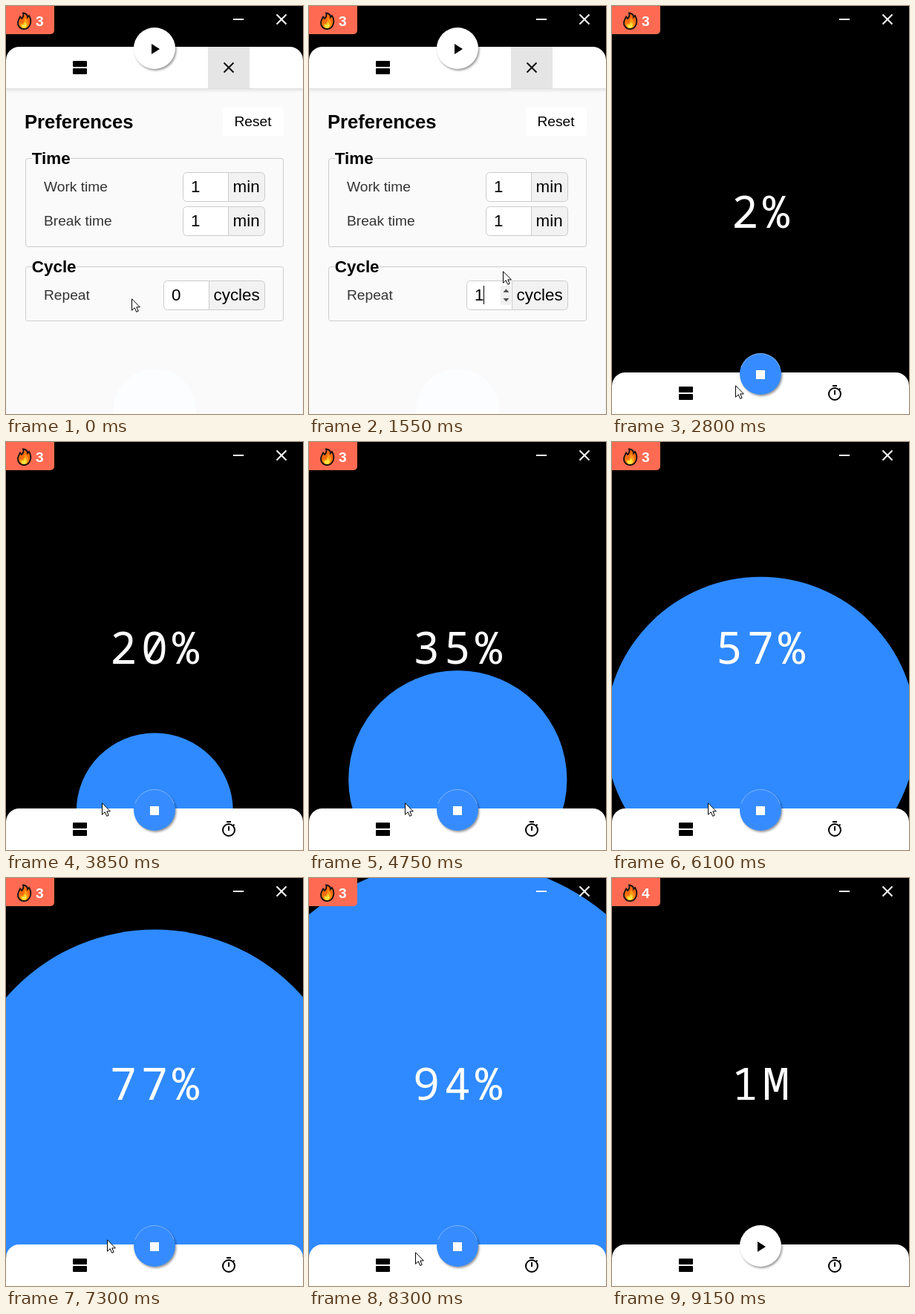
Animation of 400x550 px, one loop 9.7 s. Source, as an HTML page with a canvas:

```html
<!DOCTYPE html>
<html lang="en">
<head>
<meta charset="utf-8">
<title>Focus timer</title>
<style>
  html, body { margin: 0; width: 100%; height: 100%; overflow: hidden; background: #000; }
  canvas { display: block; width: 400px; height: 550px; }
</style>
</head>
<body>
<canvas id="stage" width="400" height="550"></canvas>
<script>
const ctx = document.getElementById('stage').getContext('2d');
const LOOP = 9700, STEP = 50;
const BLUE = '#2f8aff', BORDER = '#cccccc', PANEL = '#fafafa';
const SANS = '"Liberation Sans", Arial, sans-serif';
const CLOSE = 1950, SLIDE = 300, PRESS = 2450, START = 2640, RUN = 6000, DONE = 8700;

// Pointer keys: time, x, y
const POINTER = [
  [100, 169, 394], [350, 205, 402], [600, 244, 392], [800, 244, 392],
  [1000, 252, 383], [1200, 265, 382], [1500, 265, 382], [1550, 261, 357],
  [1850, 300, 85], [2000, 300, 85], [2350, 192, 488], [2450, 188, 490],
  [2500, 176, 493], [2550, 166, 502], [2650, 166, 502], [2700, 166, 511],
  [2850, 166, 511], [3300, 129, 486], [6200, 129, 486], [6650, 132, 487],
  [7300, 136, 487], [7600, 137, 489], [8000, 137, 489], [8650, 150, 521],
  [8800, 156, 551]
];

const clamp = v => Math.max(0, Math.min(1, v));
const smooth = v => v * v * (3 - 2 * v);

function pointerAt(t) {
  const next = POINTER.findIndex(k => k[0] >= t);
  if (next < 0) return POINTER[POINTER.length - 1].slice(1);
  if (next === 0) return POINTER[0].slice(1);
  const a = POINTER[next - 1], b = POINTER[next];
  const u = (t - a[0]) / (b[0] - a[0]);
  return [1, 2].map(i => Math.round(a[i] + (b[i] - a[i]) * u));
}

function rect(x, y, w, h, color) {
  ctx.fillStyle = color;
  ctx.fillRect(x, y, w, h);
}

function rounded(x, y, w, h, radii, fill, stroke) {
  ctx.beginPath();
  ctx.roundRect(x, y, w, h, radii);
  if (fill) { ctx.fillStyle = fill; ctx.fill(); }
  if (stroke) { ctx.strokeStyle = stroke; ctx.lineWidth = 1; ctx.stroke(); }
}

function disc(x, y, r, color) {
  ctx.fillStyle = color;
  ctx.beginPath();
  ctx.arc(x, y, r, 0, Math.PI * 2);
  ctx.fill();
}

function text(str, x, y, size, color = '#000', weight = 400) {
  ctx.font = `${weight} ${size}px ${SANS}`;
  ctx.textAlign = 'left';
  ctx.fillStyle = color;
  ctx.fillText(str, x, y);
}

function lines(d, color, width) {
  ctx.strokeStyle = color;
  ctx.lineWidth = width;
  ctx.stroke(new Path2D(d));
}

function shape(d, color) {
  ctx.fillStyle = color;
  ctx.fill(new Path2D(d));
}

function readout(str) {
  ctx.font = '300 60px "Noto Sans Mono", "DejaVu Sans Mono", monospace';
  ctx.textAlign = 'center';
  ctx.fillStyle = '#fff';
  [...str].forEach((ch, i) => ctx.fillText(ch, 200 + (i - (str.length - 1) / 2) * 42, 299));
}

function progressDisc(p) {
  const r = 49.7 + 277 * p;
  disc(200.3, 505.3 - 561 * p + r, r, BLUE);
}

function titleBar(count) {
  rounded(0, 0, 65, 38, [0, 0, 5, 0], '#ff6b52');
  const flame = 'M23 9.5C28 10 29 13 29 15L31 13C33.5 17 34 21 32.5 25C31 29 28 31 24.5 31C19 31 15.5 27 16 22C16.3 19 18 17 19 14.5L21 17C23 15 24 12 23 9.5Z';
  shape(flame, '#f76a0c');
  lines(flame, '#111', 1.8);
  shape('M25 16C28 19 30.5 21 30 25C29.5 28.5 27 30 24.5 30C20.5 30 18 27 19 23L21 24.5C24 22.5 25.5 19.5 25 16Z', '#ff9b16');
  shape('M25 21.5C27.5 24 28.5 26 27.5 28C26 30.5 22 30.5 21 28C20.4 26.5 21 25.3 21.3 24.5L22.8 25.5C24.4 24.5 25 23.2 25 21.5Z', '#ffe13b');
  text(count, 40, 27, 19.2, '#fff', 700);
  rect(306, 17, 14, 2, '#fff');
  lines('M364.5 11.5L377.5 24.5M377.5 11.5L364.5 24.5', '#fff', 2);
}

function group(label, labelWidth, y, height) {
  rounded(26.5, y + .5, 347, height, 3, null, BORDER);
  rect(35, y - 1, labelWidth, 3, PANEL);
  text(label, 34.8, y + 8, 22.4, '#000', 700);
}

function field(label, value, unit, x, split, y) {
  text(label, 51, y + 26, 19.2, '#333');
  rounded(x + .5, y + .5, split - x, 39, [5, 0, 0, 5], '#fff', BORDER);
  rounded(split + .5, y + .5, 348 - split, 39, [0, 5, 5, 0], '#f2f2f2', BORDER);
  text(value, x + 11, y + 27, 22.4);
  text(unit, split + 6.5, y + 27, 22.4);
}

function preferences(t) {
  rect(0, 111, 400, 439, PANEL);
  const fade = ctx.createLinearGradient(0, 111, 0, 117);
  fade.addColorStop(0, 'rgba(0,0,0,.09)');
  fade.addColorStop(1, 'rgba(0,0,0,0)');
  rect(0, 111, 400, 6, fade);
  rect(0, 111, 1, 439, '#f1f1f1');
  rect(399, 111, 1, 439, '#f1f1f1');

  text('Preferences', 25, 165, 25.6, '#000', 700);
  rounded(292, 137, 82, 38, 4, '#fff');
  text('Reset', 307.5, 162, 19.2);

  group('Time', 52, 205, 119);
  field('Work time', '1', 'min', 238, 299, 224);
  field('Break time', '1', 'min', 238, 299, 270);
  group('Cycle', 60, 351, 73);
  field('Repeat', t >= 1400 ? '1' : '0', 'cycles', 212, 273, 370);

  if (t >= 450) {
    rect(258, 377, 14, 26, '#f0f0f0');
    shape('M261.5 386L265.5 381.5L269.5 386ZM261.5 394L265.5 398.5L269.5 394Z', '#505050');
  }
  if (t >= 1400) rect(235, 377, 1, 25, '#000');
}

function stopwatch() {
  rect(297, 72, 6, 2, '#000');
  rect(299, 79, 2, 6, '#000');
  lines('M308 84A8 8 0 1 1 292 84A8 8 0 1 1 308 84M305.5 78.5L307.5 76.5', '#000', 2);
}

function navigation(open, running) {
  rounded(0, 55, 400, 57, open ? [18, 18, 0, 0] : [18, 18, 0, 0], '#fff');
  if (open) {
    rect(272, 55, 56, 56, '#e5e5e5');
    rect(0, 111, 400, 1, '#dedede');
    lines('M293.5 76.5L306.5 89.5M306.5 76.5L293.5 89.5', '#111', 2);
  } else {
    stopwatch();
  }
  rounded(90, 74, 19, 8, 1, '#000');
  rounded(90, 84, 19, 8, 1, '#000');

  ctx.save();
  ctx.shadowColor = 'rgba(0,0,0,.4)';
  ctx.shadowBlur = 3;
  ctx.shadowOffsetX = 1.5;
  ctx.shadowOffsetY = 2;
  disc(200, 57, 28, running ? '#368cff' : '#fff');
  ctx.restore();

  if (running) {
    ctx.strokeStyle = 'rgba(255,255,255,.35)';
    ctx.lineWidth = 1;
    ctx.beginPath();
    ctx.arc(200, 57, 27.5, Math.PI * 1.1, Math.PI * 1.9);
    ctx.stroke();
    rect(194, 52, 12, 12, '#fff');
  } else {
    shape('M196 51L207 58L196 65Z', '#000');
  }
}

function pointer(t) {
  const [x, y] = pointerAt(t);
  const overInput = t < 1400 && x > 213 && x < 258;
  ctx.save();
  ctx.translate(x, y);
  if (overInput) {
    lines('M-3 -8.5H-.5M1.5 -8.5H4M.5 -8V8M-3 8.5H-.5M1.5 8.5H4', '#000', 1);
  } else {
    const arrow = 'M.5 .8V16.3L4.2 12.8L6.7 18.4L9.2 17.3L6.8 11.9H11.4Z';
    shape(arrow, '#fff');
    lines(arrow, '#000', 1);
  }
  ctx.restore();
}

function draw(t) {
  const running = t >= PRESS && t < DONE;
  const slide = smooth(clamp((t - CLOSE) / SLIDE));
  const progress = clamp((t - START) / RUN);

  rect(0, 0, 400, 550, '#000');
  if (running) progressDisc(progress);
  else if (t >= DONE && t < 9150) progressDisc(1 - smooth((t - DONE + STEP) / 500));
  readout(running ? Math.floor(progress * 100 + 1e-6) + '%' : '1M');
  titleBar(t >= DONE ? '4' : '3');

  ctx.save();
  ctx.translate(0, Math.round(439 * slide));
  if (slide < 1) preferences(t);
  if (slide === 0) disc(200, 545, 56, '#fcfdff');
  navigation(t < CLOSE, running);
  ctx.restore();
  pointer(t);
}

const origin = performance.now();
function frame() {
  const t = (performance.now() - origin) % LOOP;
  draw(Math.floor(t / STEP) * STEP);
  requestAnimationFrame(frame);
}
frame();
</script>
</body>
</html>
```
